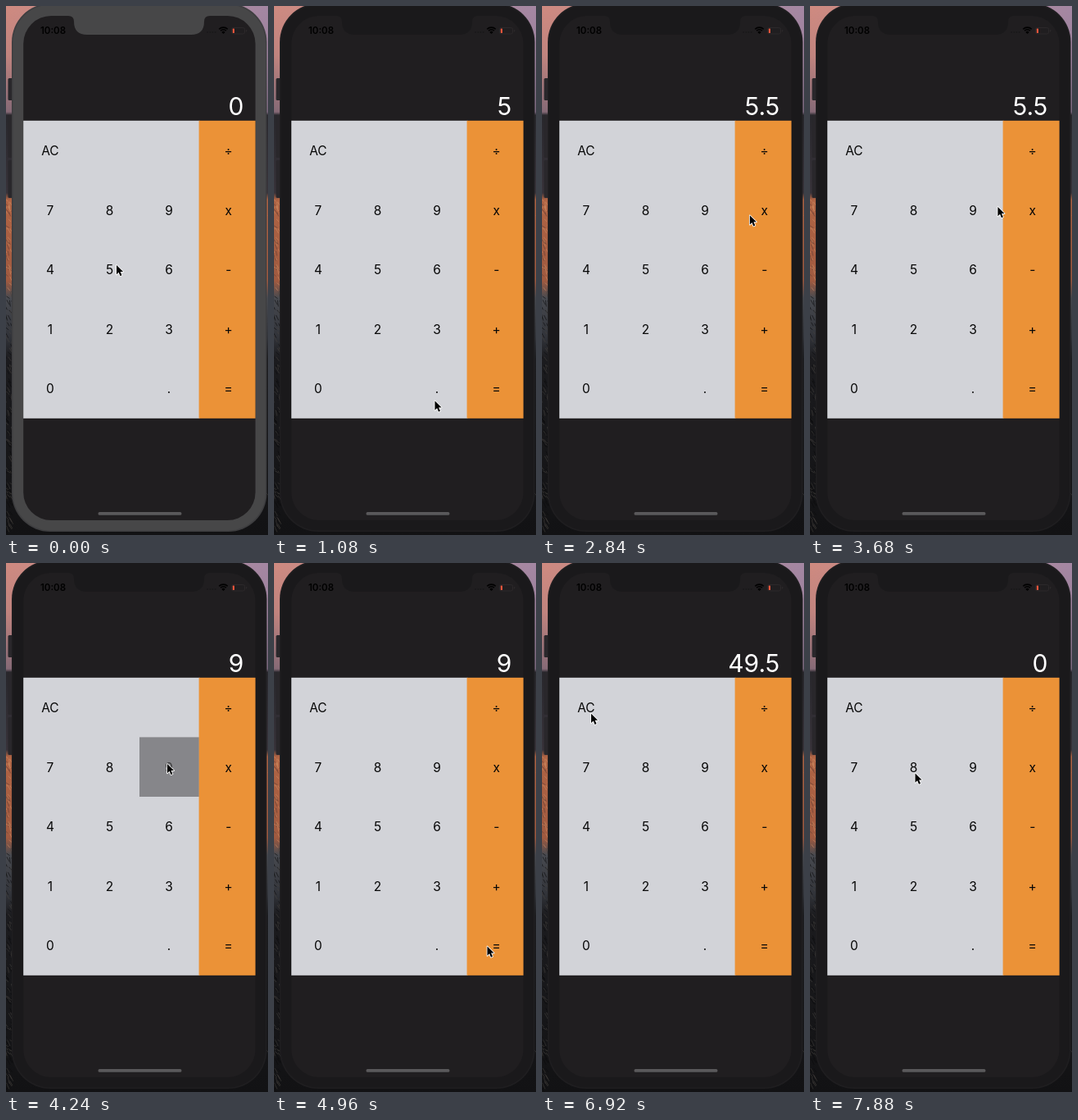
An HTML page with a canvas for the animation above (7.92 s loop, 320 by 645 pixels).

```html
<!DOCTYPE html>
<html lang="en">
<head>
<meta charset="utf-8">
<title>Calculator</title>
<style>
html, body { margin: 0; width: 100%; height: 100%; overflow: hidden; background: #17171a; }
canvas { display: block; width: 320px; height: 645px; }
</style>
</head>
<body>
<canvas id="stage" width="320" height="645"></canvas>
<script>
const canvas = document.getElementById('stage');
const ctx = canvas.getContext('2d');
const LOOP = 7920;
const FONT = 'Inter, Roboto, "Liberation Sans", sans-serif';
const SCREEN = '#201e20';
const CELL = 72.6, GRID_X = 17.8, GRID_Y = 139.8;
const PANEL = [21.2, GRID_Y, 283.4, CELL * 5];
const KEYS = ['AC', '', '', '÷', '7', '8', '9', 'x', '4', '5', '6', '-',
              '1', '2', '3', '+', '0', '', '.', '='];

// pointer stops: time, x, y
const PATH = [
  [0, 135, 316], [560, 135, 316], [1040, 196.5, 481.5], [1400, 196.5, 481.5],
  [1840, 137.5, 321], [2440, 137.5, 321], [2960, 272, 245], [3440, 272, 245],
  [3880, 197, 245], [4280, 197, 245], [4760, 260.5, 467.5], [6000, 260.5, 467.5],
  [6400, 262, 470], [6480, 262, 470], [6960, 56, 178], [7400, 56, 178],
  [7880, 128.5, 256.5]
];

// taps: key, press time, release time, display after release
const TAPS = [
  ['5', 320, 440, '5'], ['.', 1160, 1280, '5.'], ['5', 1840, 2080, '5.5'],
  ['x', 3080, 3200, '5.5'], ['9', 4000, 4120, '9'],
  ['=', 5280, 5400, '49.5'], ['AC', 7060, 7180, '0']
];

const clamp = v => Math.max(0, Math.min(1, v));
const smooth = v => { v = clamp(v); return v * v * (3 - 2 * v); };
const mix = (a, b, p) => a + (b - a) * p;

function box(g, x, y, w, h, r, fill) {
  g.beginPath();
  g.roundRect(x, y, w, h, r);
  g.fillStyle = fill;
  g.fill();
}

function label(str, x, y, font, fill, align = 'center') {
  ctx.font = font + ' ' + FONT;
  ctx.textAlign = align;
  ctx.fillStyle = fill;
  ctx.fillText(str, x, y);
}

function gradient(g, x, y, stops) {
  const fill = g.createLinearGradient(0, 0, x, y);
  stops.forEach(([at, color]) => fill.addColorStop(at / (x + y), color));
  return fill;
}

function makeWallpaper() {
  const layer = document.createElement('canvas');
  layer.width = 320;
  layer.height = 645;
  const g = layer.getContext('2d');
  g.fillStyle = gradient(g, 320, 0, [[0, '#cf8a80'], [160, '#bb8c94'], [320, '#a487a3']]);
  g.fillRect(0, 0, 320, 645);
  g.fillStyle = gradient(g, 0, 645, [
    [0, 'rgba(110,95,115,0)'], [60, 'rgba(110,95,115,.15)'], [129, 'rgba(110,95,115,.75)'],
    [133, '#28272c'], [228, '#38333a'], [236, '#b06444'], [335, '#a05a40'],
    [356, '#484a50'], [405, '#303238'], [430, '#1b1b1e'], [645, '#121214']]);
  g.fillRect(0, 0, 320, 645);

  let seed = 7;
  const rnd = () => (seed = seed * 16807 % 2147483647) / 2147483647;
  for (let i = 0; i < 260; i++) {
    const y = 236 + rnd() * 405;
    const warm = y < 346;
    const x = rnd() < 0.6 ? rnd() * 9 - 2 : rnd() * 320;
    const dark = rnd() < 0.5;
    g.strokeStyle = warm ? (dark ? '#5c3a32' : '#cd8a62') : (dark ? '#0a0a0c' : '#45423f');
    g.globalAlpha = 0.6;
    g.beginPath();
    g.moveTo(x, y);
    g.lineTo(x + 1 + rnd() * 4, y + 2 + rnd() * 6);
    g.stroke();
  }
  return layer;
}
const wallpaper = makeWallpaper();

function drawPhone(t) {
  const p = smooth((t - 240) / 240);
  const shade = (a, b) => Math.round(mix(a, b, p));
  const bezel = `rgb(${shade(71, 26)},${shade(71, 25)},${shade(72, 27)})`;
  const edge = `rgb(${shade(62, 31)},${shade(62, 30)},${shade(64, 32)})`;
  for (const [y, h] of [[88, 27], [133, 52], [188, 46]]) {
    box(ctx, 2.5, y, 6, h, 1.5, '#29272b');
  }
  box(ctx, 7, -3, 311.5, 644, 47, edge);
  box(ctx, 8.5, -1.5, 308.5, 641, 46, bezel);
  box(ctx, 21.2, 12, 283.4, 615, 34, SCREEN);
  // notch
  ctx.beginPath();
  ctx.moveTo(76, 11);
  ctx.lineTo(76, 12);
  ctx.quadraticCurveTo(83, 12, 83, 19);
  ctx.quadraticCurveTo(83, 35, 99, 35);
  ctx.lineTo(226, 35);
  ctx.quadraticCurveTo(242, 35, 242, 19);
  ctx.quadraticCurveTo(242, 12, 249, 12);
  ctx.lineTo(249, 11);
  ctx.fillStyle = bezel;
  ctx.fill();
}

function drawStatus() {
  label('10:08', 57.5, 34.3, '600 11.5px', '#000');
  for (let i = 0; i < 4; i++) box(ctx, 245 + i * 3.2, 31, 2, 2, 1, '#1a191b');
  // wifi
  ctx.strokeStyle = '#000';
  ctx.lineWidth = 1.6;
  for (const r of [7.4, 4.8]) {
    ctx.beginPath();
    ctx.arc(265.5, 33.5, r, -Math.PI * 0.75, -Math.PI * 0.25);
    ctx.stroke();
  }
  ctx.beginPath();
  ctx.moveTo(265.5, 34);
  ctx.arc(265.5, 34, 3, -Math.PI * 0.75, -Math.PI * 0.25);
  ctx.fillStyle = '#000';
  ctx.fill();
  // battery
  ctx.strokeStyle = '#2c292b';
  ctx.lineWidth = 1;
  ctx.beginPath();
  ctx.roundRect(275.5, 26.5, 16, 7.5, 2);
  ctx.stroke();
  box(ctx, 293, 28.7, 1.2, 3, 0.6, '#2c292b');
  box(ctx, 276.8, 27.6, 2.2, 5.4, 0.6, '#e8553c');
}

function keyAlpha(key, t) {
  let a = 1;
  for (const [k, down, up] of TAPS) {
    if (k !== key || t < down || t > up + 250) continue;
    a = t < up ? mix(1, 0.2, smooth((t - down) / 150))
               : mix(0.2, 1, smooth((t - up) / 250));
  }
  return a;
}

function drawKeys(t) {
  const [left, top, width, height] = PANEL;
  const split = GRID_X + CELL * 3;
  ctx.save();
  ctx.fillStyle = '#d2d3d8';
  ctx.fillRect(left, top, split + 1 - left, height);
  ctx.fillStyle = '#eb9237';
  ctx.fillRect(split, top, left + width - split, height);
  ctx.beginPath();
  ctx.rect(...PANEL);
  ctx.clip();
  KEYS.forEach((key, i) => {
    if (!key) return;
    const x = GRID_X + i % 4 * CELL;
    const y = GRID_Y + Math.floor(i / 4) * CELL;
    const a = keyAlpha(key, t);
    if (a < 1) {
      ctx.globalAlpha = 1 - a;
      ctx.fillStyle = SCREEN;
      ctx.fillRect(x, y, CELL, CELL);
    }
    ctx.globalAlpha = a;
    label(key, x + CELL / 2 - 0.2, y + 42.2, '400 15.5px', '#060606');
    ctx.globalAlpha = 1;
  });
  ctx.restore();
}

function drawDisplay(t) {
  let text = '0';
  for (const tap of TAPS) if (t >= tap[2]) text = tap[3];
  label(text, 290.4, 132.5, '400 30px', '#fff', 'right');
}

function drawPointer(t) {
  let i = 0;
  while (i < PATH.length - 2 && t >= PATH[i + 1][0]) i++;
  const [t0, x0, y0] = PATH[i], [t1, x1, y1] = PATH[i + 1];
  const p = smooth((t - t0) / (t1 - t0));
  ctx.save();
  ctx.translate(mix(x0, x1, p), mix(y0, y1, p));
  ctx.scale(0.94, 0.94);
  ctx.beginPath();
  [[0, 0], [0, 12], [2.8, 9.4], [4.8, 14], [6.9, 13.1], [4.9, 8.6], [8.6, 8.6]]
    .forEach(([x, y]) => ctx.lineTo(x, y));
  ctx.closePath();
  ctx.lineJoin = 'round';
  ctx.lineWidth = 1.8;
  ctx.strokeStyle = '#fff';
  ctx.stroke();
  ctx.fillStyle = '#000';
  ctx.fill();
  ctx.restore();
}

let start;
function frame(now) {
  if (start === undefined) start = now;
  const t = Math.floor((now - start) % LOOP / 40) * 40;
  ctx.drawImage(wallpaper, 0, 0);
  drawPhone(t);
  drawStatus();
  drawDisplay(t);
  drawKeys(t);
  box(ctx, 112.5, 617, 102, 3.8, 1.9, '#5a595b');
  drawPointer(t);
  requestAnimationFrame(frame);
}
requestAnimationFrame(frame);
</script>
</body>
</html>
```
